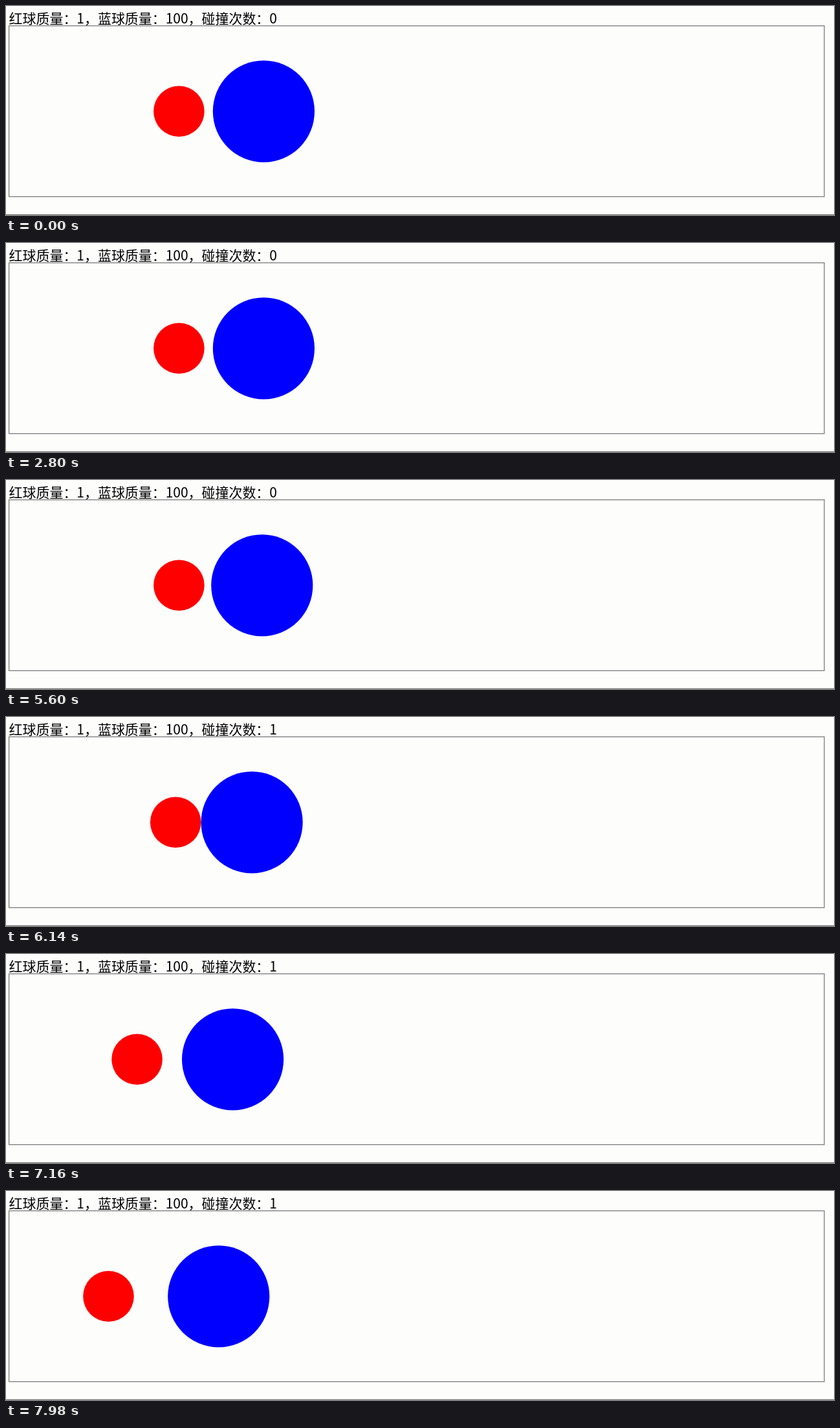
These frames come from a looping animation (1280x323 px, 8000 ms). An HTML page with a canvas:

```html
<!DOCTYPE html>
<html lang="zh-CN">
<head>
<meta charset="utf-8">
<title>碰撞次数</title>
<style>
  html, body { margin: 0; width: 100%; height: 100%; overflow: hidden; background: #fdfdfc; }
  canvas { display: block; width: 1280px; height: 323px; }
</style>
</head>
<body>
<canvas id="stage" width="1280" height="323" lang="zh-CN"></canvas>
<script>
const ctx = document.getElementById('stage').getContext('2d');
const LOOP = 8000;
const SCALE = 1.31;          // pixels per world unit
const ORIGIN = { x: 5.4, y: 162.8 };

const red = { mass: 1, radius: 30, x: 200, color: '#f00' };
const blue = { mass: 100, radius: 60, x: 300, v: -1, color: '#00f' };
const HIT_TICK = 12;

// Stretches of steady ticking: start ms, start tick, end ms, end tick
const runs = [
  [5600, 2, 6140, 14],
  [6140, 14, 6320, 18],
  [6420, 20, 6600, 25],
  [6700, 26, 7160, 37],
  [7260, 38, 7980, 54]
];

function tickAt(ms) {
  let tick = 0;
  for (const [t0, n0, t1, n1] of runs) {
    if (ms < t0) break;
    const part = Math.min(1, (ms - t0) / (t1 - t0));
    tick = Math.floor(n0 + (n1 - n0) * part + 1e-6);
  }
  return tick;
}

// One elastic collision with the red ball at rest
function stateAt(tick) {
  const before = Math.min(tick, HIT_TICK);
  const after = tick - before;
  const total = red.mass + blue.mass;
  const redV = 2 * blue.mass * blue.v / total;
  const blueV = (blue.mass - red.mass) * blue.v / total;
  return {
    redX: red.x + redV * after,
    blueX: blue.x + blue.v * before + blueV * after,
    hits: tick >= HIT_TICK ? 1 : 0
  };
}

function disc(ball, x) {
  ctx.beginPath();
  ctx.arc(ORIGIN.x + x * SCALE, ORIGIN.y, ball.radius * SCALE, 0, Math.PI * 2);
}

function fillDisc(ball, x, color) {
  disc(ball, x);
  ctx.fillStyle = color;
  ctx.fill();
}

function draw(ms) {
  const { redX, blueX, hits } = stateAt(tickAt(ms));

  ctx.fillStyle = '#fdfdfc';
  ctx.fillRect(0, 0, 1280, 323);

  ctx.strokeStyle = '#7c7c7c';
  ctx.lineWidth = 1.3;
  ctx.strokeRect(4.6, 30.6, 1260.4, 264);
  ctx.fillStyle = '#7c7c7c';
  ctx.fillRect(0, 321.8, 1280, 1.2);

  ctx.fillStyle = '#000';
  ctx.font = '20.96px "Noto Sans CJK SC", "Noto Sans CJK", sans-serif';
  ctx.fillText(`红球质量：${red.mass}，蓝球质量：${blue.mass}，碰撞次数：${hits}`, 4.6, 26.6);

  fillDisc(red, redX, red.color);
  fillDisc(blue, blueX, blue.color);

  // The overlap of the two balls is black
  ctx.save();
  disc(red, redX);
  ctx.clip();
  fillDisc(blue, blueX, '#000');
  ctx.restore();
}

const start = performance.now();
function frame() {
  draw((performance.now() - start) % LOOP);
  requestAnimationFrame(frame);
}
frame();
</script>
</body>
</html>
```
